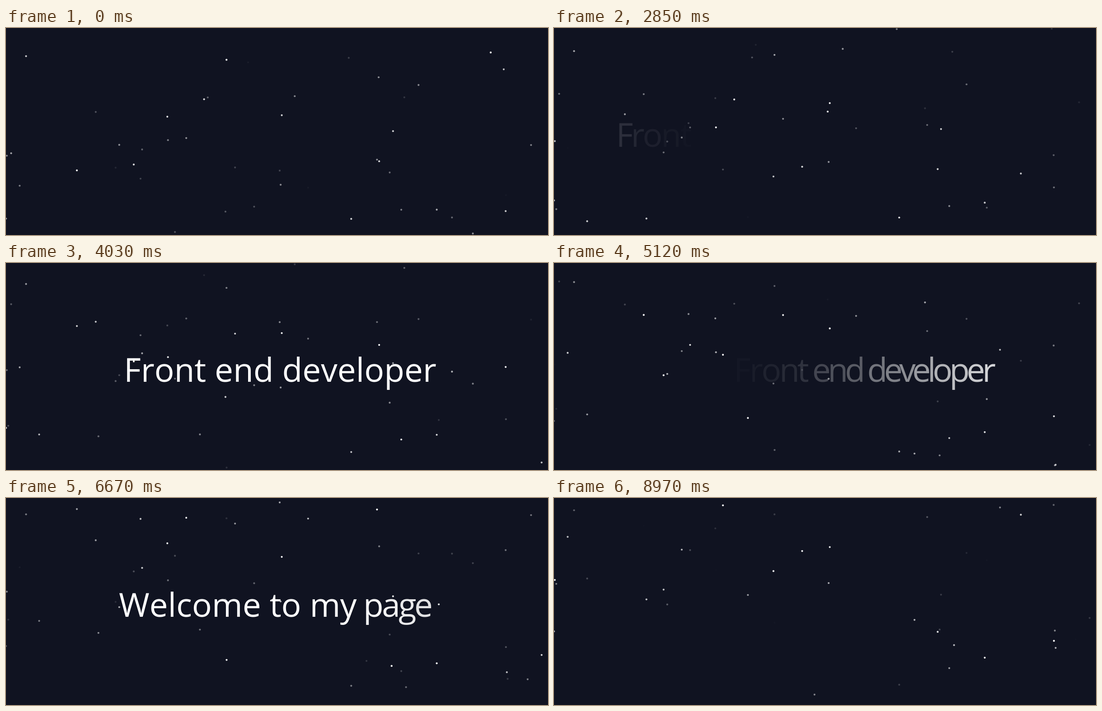
These frames come from a looping animation (1200 px wide and 460 px high, 9000 ms). An HTML page with a canvas:

```html
<!DOCTYPE html>
<html lang="en">
<head>
<meta charset="utf-8">
<title>Starfield greeting</title>
<style>
  html, body { margin: 0; width: 100%; height: 100%; overflow: hidden; background: #101321; }
  canvas { display: block; }
</style>
</head>
<body>
<canvas id="sky" width="1200" height="460"></canvas>
<script>
const WIDTH = 1200, HEIGHT = 460, LOOP = 9;
const STAGGER = .025, GLIDE = .7, SHIFT = 140, BASELINE = 264;
const ctx = document.getElementById('sky').getContext('2d');

let seed = 7;
const random = () => (seed = seed * 16807 % 2147483647) / 2147483647;

// 46 stars start in view, the others rise into it later
const stars = Array.from({ length: 60 }, (_, i) => {
  const late = i >= 46;
  return {
    x: WIDTH * random(),
    y: late ? 500 + 200 * random() : HEIGHT * random(),
    speed: late ? 28 + 16 * random() : 49 * random(),
    phase: 2 * random(),
    rate: .6 * random()
  };
});

const lines = [
  { text: "Hi, I'm Julian Pavro", x: 286, start: .02, end: 1.48 },
  { text: 'Front end developer', x: 261, start: 2.7, end: 4.48 },
  { text: 'Welcome to my page', x: 250, start: 5.7, end: 7.48 }
];

ctx.font = '73px "Open Sans", "Noto Sans", sans-serif';
ctx.fontKerning = 'none';

function ease(x) {
  x = Math.min(1, Math.max(0, x));
  return x * x * (3 - 2 * x);
}

// Brightness is a triangle wave between 0 and 1
function drawStar({ x, y, speed, phase, rate }, t) {
  ctx.globalAlpha = Math.abs((phase + rate * t) % 2 - 1);
  ctx.beginPath();
  ctx.arc(x, y - speed * t, 2.1, 0, 7);
  ctx.fill();
}

// Letters glide in from the left one after another and leave to the right
function drawLine({ text, x, start, end }, t) {
  [...text].forEach((letter, i) => {
    const shown = ease((t - start - i * STAGGER) / GLIDE);
    const gone = ease((t - end - i * STAGGER) / GLIDE);
    const left = x + ctx.measureText(text.slice(0, i)).width;
    ctx.globalAlpha = shown * (1 - gone);
    ctx.fillText(letter, left + SHIFT * (shown - 1 + gone), BASELINE);
  });
}

function draw(t) {
  ctx.globalAlpha = 1;
  ctx.fillStyle = '#101321';
  ctx.fillRect(0, 0, WIDTH, HEIGHT);
  ctx.fillStyle = '#fff';
  stars.forEach(star => drawStar(star, t));
  lines.forEach(line => drawLine(line, t));
}

let begin;
function frame(now) {
  begin ??= now;
  draw((now - begin) / 1000 % LOOP);
  requestAnimationFrame(frame);
}
requestAnimationFrame(frame);
</script>
</body>
</html>
```
